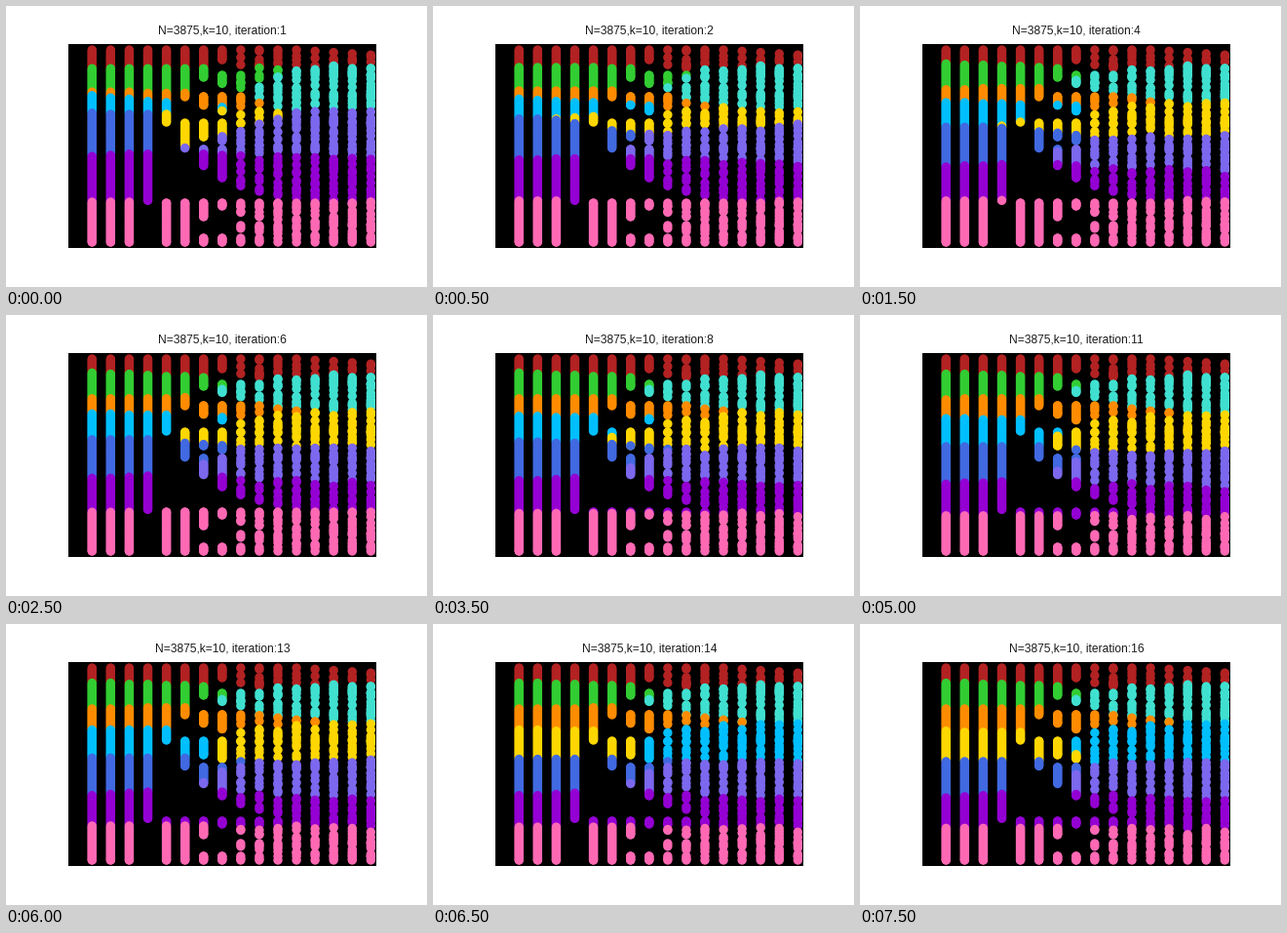
A matplotlib script that plays this animation: 432x288 px, repeating every 8 s.

```python
import numpy as np
import matplotlib.pyplot as plt
from matplotlib.animation import FuncAnimation
from matplotlib.patches import Rectangle

W, H, DPI = 432, 288, 72
ITERATIONS, STEP_MS = 16, 500
COLUMNS, TOP, BOTTOM = 16, 45, 242
X_WEIGHT = 6  # squared weight of one column against one pixel of height

COLORS = np.array(["firebrick", "limegreen", "turquoise", "darkorange",
                   "deepskyblue", "gold", "royalblue", "mediumslateblue",
                   "darkviolet", "hotpink"])

# Cluster centres: columns before and after settling, heights at three poses
X_START = np.array([5, 5, 14, 4.5, 3.5, 7, 2, 12, 8, 8])
X_SETTLED = np.array([7, 4.5, 11.3, 5, 4, 10.7, 3, 12, 8, 8])
Y_START = np.array([45, 82, 88, 95, 98.5, 121.5, 122, 126.5, 179, 222])
Y_SETTLED = np.array([51, 73.5, 79, 95, 105, 117.5, 142, 149, 180, 217.5])
Y_END = np.array([51, 74.5, 81, 97.5, 123.5, 121, 157, 162, 189, 229])

# Gaps open at a column and shrink towards their lower end: column, end, size
GAPS = [(5, 202, 83), (6, 120, 27), (7, 93, 20), (7, 147, 13),
        (7, 238, 22), (8, 71, 16), (8, 225, 20)]
SHRINK = 0.68


def column_heights(col, rng):
    top = TOP + max(0, 1.3 * (col - 12))
    bottom = 199.3 if col == 4 else BOTTOM
    if col <= 8:
        steps = np.full(200, 1.2)
    else:
        steps = rng.uniform(0.5, 9.5 - 0.4 * (col - 9), 200)
    ys = np.append(top + np.cumsum(steps), [top, bottom])
    gaps = [(end - size * SHRINK ** (col - first), end)
            for first, end, size in GAPS if col >= first]
    ys = np.append(ys, np.ravel(gaps))
    keep = ys <= bottom
    for lo, hi in gaps:
        keep &= (ys <= lo) | (ys >= hi)
    return np.sort(ys[keep])


def make_points():
    rng = np.random.default_rng(5)
    return np.array([(col, y) for col in range(1, COLUMNS + 1)
                     for y in column_heights(col, rng)])


def mix(a, b, t):
    return a + (b - a) * t


def centres(iteration):
    """Quick settling up to iteration 4, then a slowing drift."""
    pace = np.sqrt(iteration)
    settle = min(pace - 1, 1)
    drift = max(pace - 2, 0) / 2
    x = mix(X_START, X_SETTLED, settle)
    y = mix(mix(Y_START, Y_SETTLED, settle), Y_END, drift)
    return np.column_stack([x, y])


def assign(iteration):
    """Nearest centre of each point, ranked from top to bottom."""
    c = centres(iteration)
    c = c[np.argsort(c[:, 1])]
    diff = points[:, None] - c[None]
    return (X_WEIGHT * diff[..., 0] ** 2 + diff[..., 1] ** 2).argmin(axis=1)


points = make_points()
pixels = np.column_stack([88.3 + 19.07 * (points[:, 0] - 1), points[:, 1]])

fig = plt.figure(figsize=(W / DPI, H / DPI), dpi=DPI, facecolor="white")
ax = fig.add_axes([0, 0, 1, 1])
ax.set(xlim=(0, W), ylim=(H, 0))
ax.axis("off")
ax.add_patch(Rectangle((64, 39), 316, 209, color="black", lw=0))
dots = ax.scatter(*pixels.T, s=9.4 ** 2, linewidths=0, zorder=2)
title = ax.text(222, 28.4, "", ha="center", va="baseline", fontsize=12,
                family="Liberation Sans", color="#1a1a1a")


def update(i):
    rank = assign(i + 1)
    order = np.argsort(rank, kind="stable")
    dots.set_offsets(pixels[order])
    dots.set_facecolor(COLORS[rank[order]])
    title.set_text(f"N=3875,k=10, iteration:{i + 1}")
    return dots, title


anim = FuncAnimation(fig, update, frames=ITERATIONS, interval=STEP_MS,
                     repeat=True, repeat_delay=0)
plt.show()
```
